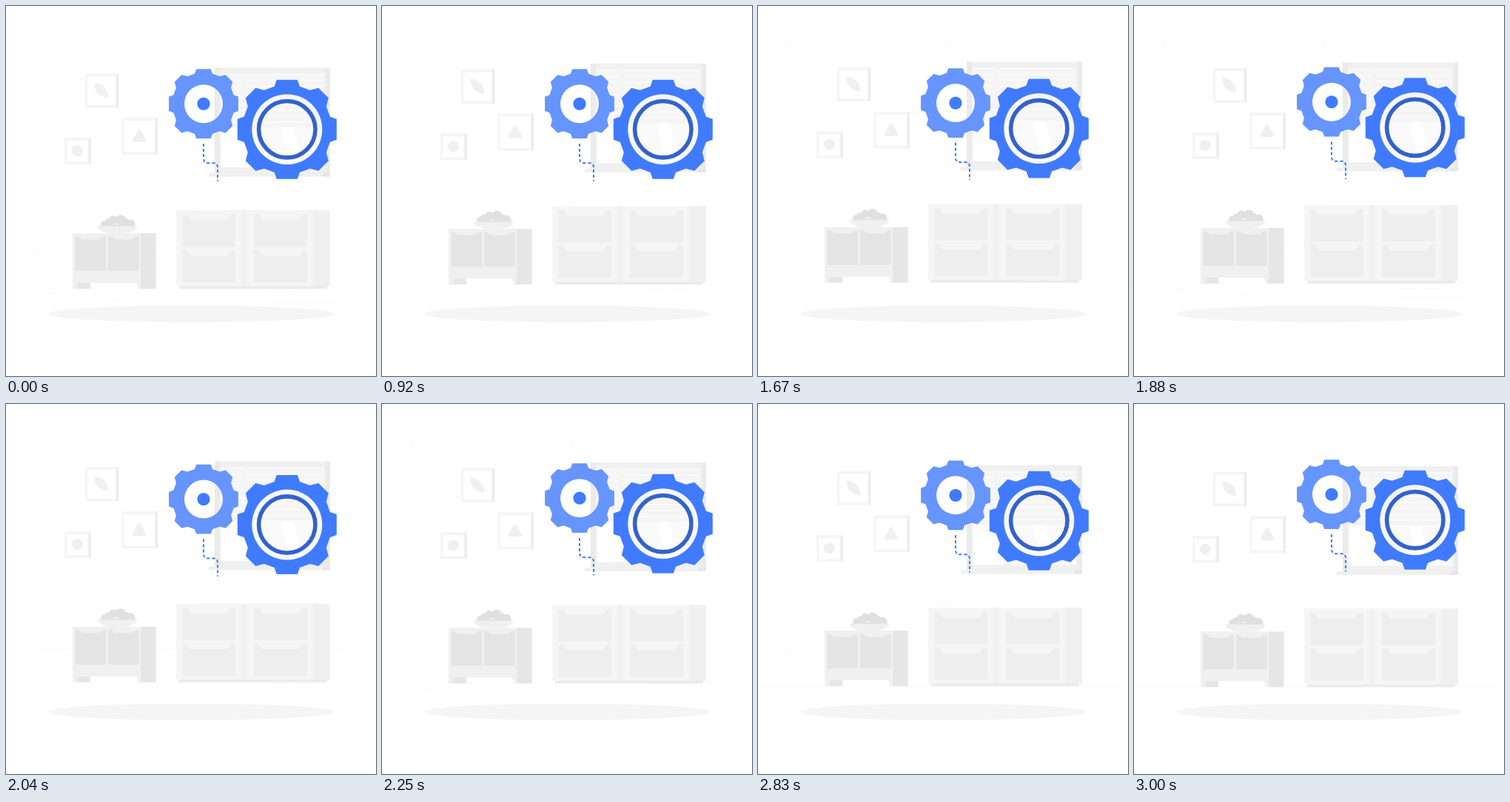
An HTML page for the animation above (3.04 s loop, 500 px wide and 500 px high).

```html
<!DOCTYPE html>
<html lang="en">
<head>
<meta charset="utf-8">
<title>Floating gears</title>
<style>
  html, body { margin: 0; width: 100%; height: 100%; overflow: hidden; background: #fff; }
  svg { display: block; width: 100vw; height: 100vh; }
</style>
</head>
<body>
<svg viewBox="0 0 500 500">
  <ellipse cx="250" cy="416" rx="193.5" ry="11.3" fill="#f5f5f5"/>
  <g id="room">
    <g fill="none" stroke="#ebebeb" stroke-width=".3">
      <rect x="38.9" y="55.1" width="204" height="282.6" rx="5.5"/>
      <rect x="254.9" y="55.1" width="204" height="282.6" rx="5.5"/>
      <path d="M0 382.5H497M56 390.6H72M135 397.8H160M249 394.6H255M359 389.3H388M392 389.3H416M357 401.6H448"/>
    </g>
    <g id="pictures"></g>
    <g fill="#f0f0f0">
      <path d="M119.5 104.5C130 105 138.5 112 138 124.5C127 124 119 116.500 119.500 104.500Z"/>
      <path d="M178 168.500Q180 166 182 168.500L189 181.500Q189.500 184.500 187 184.500H173Q170.500 184.500 171 181.500Z"/>
      <circle cx="96.200" cy="196" r="7.500"/>
    </g>
    <g id="window">
      <path fill="#f0f0f0" d="M282 84H438V227H282Z"/>
      <path fill="#ebebeb" d="M282 84H289.500V227H282ZM432 84H438V227H432Z"/>
      <path fill="#fafafa" d="M289.500 92H430V218.500H289.500Z"/>
      <path fill="#fff" d="M292 165H326V218.500H292ZM372 165L384 218.500H404L388 165Z"/>
      <path fill="#f5f5f5" d="M319 92H327L332 165H324Z"/>
      <g id="blinds" fill="#f5f5f5"></g>
      <path fill="#f0f0f0" d="M274 226H438V231H274Z"/>
      <path fill="#e6e6e6" d="M428 226H438V231H428Z"/>
    </g>
    <g id="dresser">
      <path fill="#ebebeb" d="M234 378H434V382.500H234Z"/>
      <path fill="#f5f5f5" d="M230 276.500H415V379H230Z"/>
      <path fill="#f0f0f0" d="M319 276.500H325.500V379H319ZM415 276.500H438V379H415Z"/>
    </g>
    <g id="cupboard">
      <path fill="#e6e6e6" d="M95 374H114V382.500H95ZM182 307.500H202.500V382.500H182Z"/>
      <path fill="#f0f0f0" d="M90 307.500H182V382.500H179L176 374.500H98L95 382.500H90Z"/>
    </g>
    <g id="fruit" fill="#e0e0e0"></g>
    <path fill="#f0f0f0" d="M122.500 298H178Q173 307.500 157 307.500H144Q128 307.500 122.500 298Z"/>
  </g>
  <g id="gears">
    <path id="small" fill="#6695ff" fill-rule="evenodd"/>
    <circle cx="267" cy="132.200" r="8.600" fill="#407bff"/>
    <path id="large" fill="#407bff" fill-rule="evenodd"/>
    <circle cx="379.800" cy="166.700" r="38.200" fill="none" stroke="#3362cc" stroke-width="5.600"/>
    <path d="M267 186V206Q267 212.200 273 212.200H280Q286 212.200 286 218.200V236.500" fill="none" stroke="#407bff" stroke-width="2" stroke-dasharray="4 3"/>
  </g>
</svg>
<script>
const LOOP = 3040, HALF = 1500, LIFT = 10;
const $ = id => document.getElementById(id);

function add(parent, tag, attrs) {
  const node = document.createElementNS("http://www.w3.org/2000/svg", tag);
  for (const key in attrs) node.setAttribute(key, attrs[key]);
  $(parent).appendChild(node);
}

// One quarter of the cog outline, turned four times, around a round hole.
function cog(cx, cy, scale, hole) {
  const quarter = [[-14, -67], [14, -67], [17.2, -58], [31, -53], [42.5, -56], [56, -42.5], [53, -31], [58, -17.2]];
  const points = [];
  for (let turn = 0; turn < 4; turn++) {
    for (const [x, y] of quarter) {
      const [px, py] = [[x, y], [-y, x], [-x, -y], [y, -x]][turn];
      points.push(`${cx + px * scale} ${cy + py * scale}`);
    }
  }
  return `M${points.join("L")}ZM${cx - hole} ${cy}a${hole} ${hole} 0 1 0 ${2 * hole} 0a${hole} ${hole} 0 1 0 ${-2 * hole} 0Z`;
}

function picture(x, y, w, h) {
  add("pictures", "rect", { x, y, width: w, height: h, fill: "#f5f5f5" });
  add("pictures", "rect", { x: x + w - 2.5, y, width: 2.5, height: h, fill: "#ebebeb" });
  add("pictures", "rect", { x: x + 3, y: y + 4, width: w - 7, height: h - 7.5, fill: "#fff" });
}

// Panel with a rounded grip cut out of its top edge.
function panel(parent, x, y, w, h, inset, depth, fill) {
  const d = `M${x} ${y}h${inset}c4 0 3 ${depth} 8 ${depth}H${x + w - inset - 8}` +
    `c5 0 4 ${-depth} 8 ${-depth}h${inset}v${h}h${-w}Z`;
  add(parent, "path", { d, fill });
}

picture(107, 91.5, 45, 46.5);
picture(156.8, 151.5, 48, 50);
picture(79.2, 178.4, 35.3, 35.8);

for (let i = 0; i < 9; i++) {
  add("blinds", "rect", { x: 289.5, y: 94 + i * 8, width: 140, height: 6 });
}

for (const x of [238.3, 335.1]) {
  for (const y of [282, 330]) panel("dresser", x, y, 71.7, 43.8, 5, 8, "#eeeeee");
}
for (const x of [93.5, 138]) panel("cupboard", x, 312, 41.5, 46.5, 3, 4, "#e4e4e4");

for (const [cx, cy, r] of [[133, 296, 5], [138, 293, 5], [145, 290, 6], [155, 289.5, 6.8], [161, 293, 6], [168.5, 295, 6]]) {
  add("fruit", "circle", { cx, cy, r });
}
add("fruit", "path", { d: "M128 298.5V296H174.500V298.5Z" });

$("small").setAttribute("d", cog(267, 132.2, 0.7, 26));
$("large").setAttribute("d", cog(379.8, 166.7, 1, 47.5));

function floating(t) {
  return -LIFT * Math.max(0, 1 - Math.abs(t - HALF) / HALF);
}

function draw(t) {
  $("room").setAttribute("transform", `translate(0 ${floating(Math.max(t, 60))})`);
  $("gears").setAttribute("transform", `translate(0 ${floating(Math.max(0, t - HALF))})`);
}

const start = performance.now();
function tick() {
  draw((performance.now() - start) % LOOP);
  requestAnimationFrame(tick);
}
draw(0);
requestAnimationFrame(tick);
</script>
</body>
</html>
```
